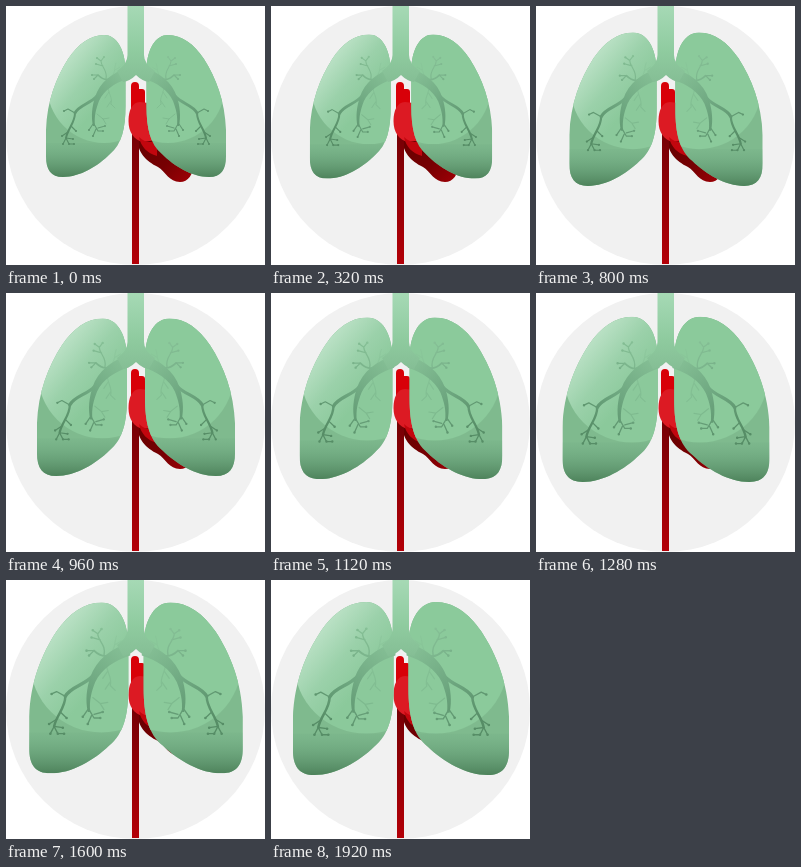
Recreate the animation shown at these times as an HTML page. Size 259 px wide and 259 px high, loop 2 s.

```html
<!DOCTYPE html>
<html>
<head>
<meta charset="utf-8">
<style>
html, body { margin: 0; width: 100%; height: 100%; overflow: hidden; background: #fff; }
svg { display: block; width: 100vw; height: 100vh; }
</style>
</head>
<body>
<svg viewBox="0 0 259 259">
<defs>
  <linearGradient id="shine" gradientUnits="userSpaceOnUse" x1="50" y1="58" x2="96" y2="96">
    <stop stop-color="#c0e4ca"/><stop offset=".55" stop-color="#9bd1aa"/><stop offset="1" stop-color="#8bc99b"/>
  </linearGradient>
  <linearGradient id="shade" x1="0" y1="0" x2="0" y2="1">
    <stop stop-color="#6ca780" stop-opacity=".15"/><stop offset="1" stop-color="#4c8059"/>
  </linearGradient>
  <linearGradient id="pipe" x1="0" y1="0" x2="0" y2="1">
    <stop stop-color="#a6d9b5"/><stop offset=".6" stop-color="#8fcb9f"/><stop offset="1" stop-color="#85be95"/>
  </linearGradient>
  <linearGradient id="bronchus" gradientUnits="userSpaceOnUse" x1="118" y1="66" x2="66" y2="130">
    <stop stop-color="#86c096"/><stop offset=".5" stop-color="#6fa881"/><stop offset="1" stop-color="#568d66"/>
  </linearGradient>
  <linearGradient id="blood" x1="0" y1="0" x2="0" y2="1">
    <stop stop-color="#740005"/><stop offset=".5" stop-color="#940006"/><stop offset="1" stop-color="#b30008"/>
  </linearGradient>
  <linearGradient id="muscle" x1="0" y1="0" x2="1" y2="1">
    <stop stop-color="#640000"/><stop offset=".6" stop-color="#760002"/><stop offset="1" stop-color="#a00006"/>
  </linearGradient>
  <clipPath id="edge">
    <path d="M98 29C110 29 119 42 119.5 64V100C119.500 122 116 138 104 148C92 160 74 171 57 171C45 171 40 164 40 150V124C41 95 50 72 62 53C72 38 84 29 98 29Z"/>
  </clipPath>
  <g id="lung">
    <g clip-path="url(#edge)">
      <rect x="38" y="26" width="84" height="148" fill="#7fba8e"/>
      <ellipse cx="98" cy="79" rx="57" ry="58"/>
      <rect x="38" y="137" width="84" height="35" fill="url(#shade)"/>
    </g>
    <g fill="none" stroke="url(#bronchus)" stroke-linecap="round" stroke-linejoin="round">
      <path fill="url(#bronchus)" stroke="none" d="M121 62C106 67 94 76 89 91C86 101 85 110 87 120L89 120C88 110 90 103 93 95C98 84 109 77 121 73Z"/>
      <path stroke-width="2.800" d="M91 90C84 98 73 99 69 107"/>
      <path stroke-width="2" d="M69 107C69 117 62 122 60 132"/>
      <path stroke-width="1.6" d="M104 73C98 75 94 71 92 69"/>
      <path stroke-width="1.1" d="M69 107L62 103L58 105M65 120L70 125M60 132L57 138M60 132L63 138L68 138M60 132L67 133M62 126L56 130M87 118L83 124M88 118L92 125L97 125M90 123L87 130M92 122L99 120M100 73C102 64 95 61 95 55M97 60L90 58M95 55L91 52M95 55L98 51M92 69L86 69M92 69L88 73"/>
      <path stroke-width="1" opacity=".4" d="M102 80C102 88 107 91 105 98M103 86L99 92M105 95L101 101M105 98L109 102M91 108L97 113L103 112M97 113L100 118M105 72C110 66 108 61 110 57M109 64L114 61"/>
      <path stroke-width="2.1" d="M58 105h0M70 125h0M57 138h0M68 138h0M63 138h0M67 133h0M56 130h0M83 124h0M97 125h0M87 130h0M99 120h0M90 58h0M91 52h0M98 51h0M86 69h0M88 73h0"/>
    </g>
  </g>
</defs>
<circle cx="129.5" cy="129.5" r="129.5" fill="#f1f1f1"/>
<path fill="url(#muscle)" d="M131 129C131 147 140 155 152 161C160 166 163 176 174 176C182 176 188 168 186 160L165 120Z"/>
<rect x="126" y="125" width="7" height="133" fill="url(#blood)"/>
<path fill="#d80008" d="M125 110V80A4 4 0 0 1 133 80V83H136Q139 83 139 86V110Z"/>
<path fill="#dc1a23" d="M134 96C126 96 122.500 105 122.500 115C122.500 126 128 134 137 136L151 134V98Z"/>
<path fill="#c2060e" d="M133 131C139 137 145 137 151 134V150C141 147 135 141 133 131Z"/>
<g id="left"><use href="#lung" fill="url(#shine)"/></g>
<g transform="matrix(-1 0 0 1 260 0)"><g id="right"><use href="#lung" fill="#8bca9b"/></g></g>
<path fill="url(#pipe)" d="M121.500 0H138V49Q138 58 149 65L143 76Q136 75 130 69Q124 75 117 76L111 65Q121.500 58 121.500 49Z"/>
</svg>
<script>
const sides = ["left", "right"].map(id => document.getElementById(id));
const loop = 2000, step = 80;

function draw(now) {
  const u = Math.floor(now % loop / step) * step / (loop - step);
  const breath = (1 - Math.cos(Math.PI * u)) / 2;
  const size = `${1 + 0.266 * breath} ${1 + 0.218 * breath}`;
  for (const side of sides)
    side.setAttribute("transform", `translate(108 61) scale(${size}) translate(-108 -61)`);
  requestAnimationFrame(draw);
}
draw(performance.now());
</script>
</body>
</html>
```
